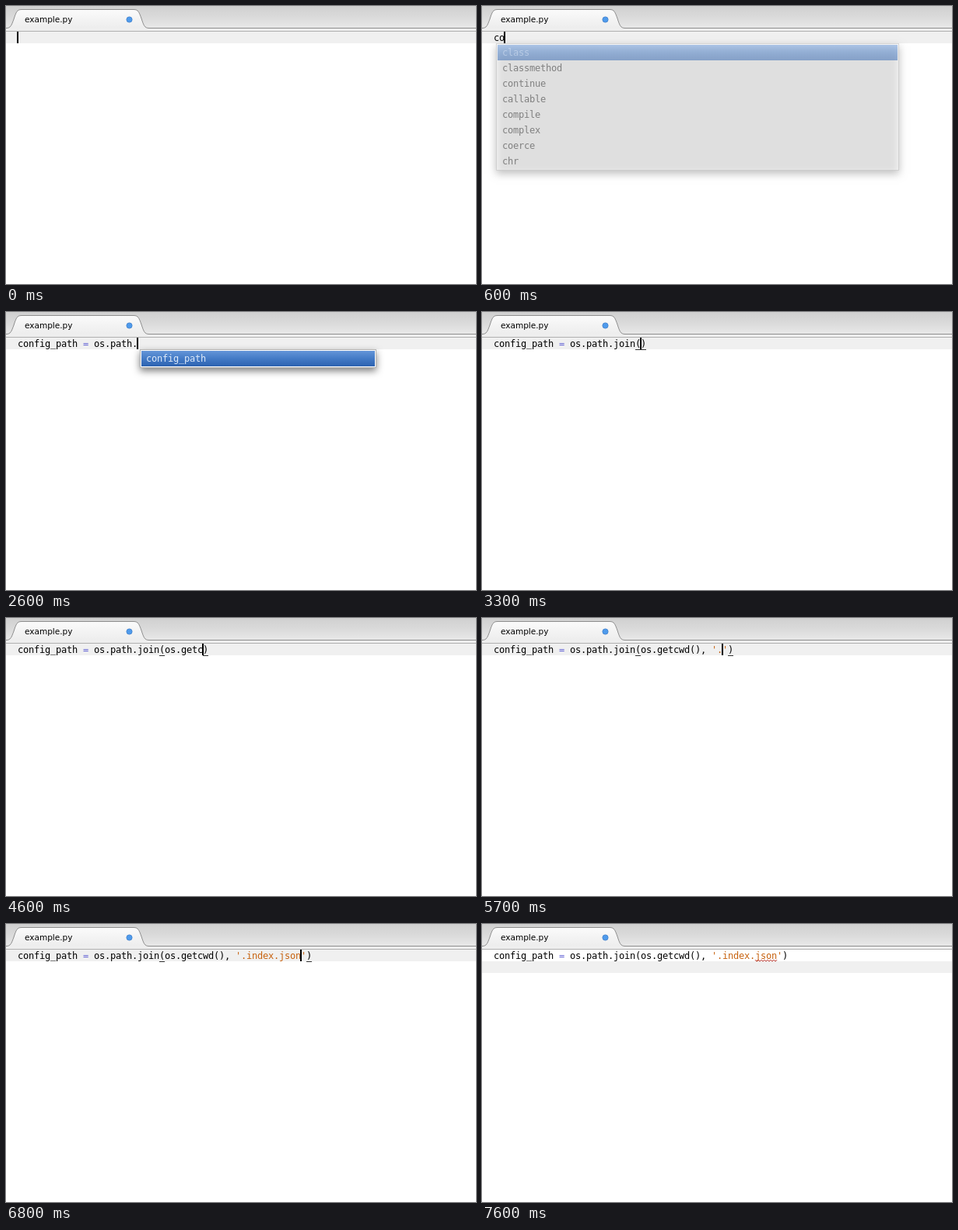
Write an HTML page with a canvas that moves like this. It is 604 px wide and 358 px high and loops after 8000 ms.

```html
<!DOCTYPE html>
<html lang="en">
<head>
<meta charset="utf-8">
<title>Editor autocomplete</title>
<style>
html, body { margin: 0; width: 604px; height: 358px; overflow: hidden; background: #fff; }
canvas { display: block; }
</style>
</head>
<body>
<canvas id="stage" width="604" height="358"></canvas>
<script>
const ctx = document.getElementById('stage').getContext('2d');
const W = 604, H = 358, LOOP = 8000, STEP = 100;
const LEFT = 15, CELL = 7, TOP = 33, ROW = 15;
const MONO = '12px "DejaVu Sans Mono", monospace';
const FULL = "config_path = os.path.join(os.getcwd(), '.index.json')";

// [time, caret column, text after the caret]
const typing = [
  [0, 0, ''], [200, 1, ''], [600, 2, ''], [700, 4, ''], [800, 5, ''],
  [900, 6, ''], [1000, 7, ''], [1100, 8, ''], [1200, 9, ''], [1300, 11, ''],
  [1400, 12, ''], [1500, 13, ''], [1600, 14, ''], [1700, 17, ''],
  [1900, 18, ''], [2000, 19, ''], [2100, 20, ''], [2200, 21, ''],
  [2400, 22, ''], [2700, 23, ''], [3000, 26, ''], [3300, 27, ')'],
  [3400, 28, ')'], [3500, 29, ')'], [3600, 30, ')'], [3800, 31, ')'],
  [4100, 32, ')'], [4300, 33, ')'], [4600, 34, ')'], [4700, 35, ')'],
  [4800, 36, ')'], [5000, 37, '))'], [5300, 38, ')'], [5400, 39, ')'],
  [5500, 40, ')'], [5600, 41, "')"], [5700, 42, "')"], [6000, 45, "')"],
  [6100, 47, "')"], [6300, 48, "')"], [6400, 49, "')"], [6500, 50, "')"],
  [6700, 51, "')"], [6800, 52, "')"]
];
const ENTER = 7000, SPELL = 7300;

const words = ['getcwd', 'join', 'path', 'config_path'];
const starters = ['class', 'classmethod', 'continue', 'callable',
  'compile', 'complex', 'coerce', 'chr'];

// open and close times, column, rows, width
const popups = [
  { open: 300, close: 600, col: 0, rows: starters, width: 518 },
  { open: 1800, close: 1900, col: 17, rows: words.slice(3) },
  { open: 2500, close: 2700, col: 22, rows: words.slice(3) },
  { open: 3700, close: 3800, col: 30, rows: words.slice(1) },
  { open: 5800, close: 6000, col: 42, rows: words },
  { open: 6300, close: 6400, col: 48, rows: words, cut: true },
  { open: 6400, close: 6500, col: 48, rows: ['join'] }
];

const colX = col => LEFT + col * CELL;

function rect(x, y, w, h, fill) {
  ctx.fillStyle = fill;
  ctx.fillRect(x, y, w, h);
}

function gradient(y0, y1, ...colors) {
  const g = ctx.createLinearGradient(0, y0, 0, y1);
  colors.forEach((c, i) => g.addColorStop(i / (colors.length - 1), c));
  return g;
}

// Monospaced text on a whole-pixel grid
function mono(text, x, y, colorAt) {
  ctx.font = MONO;
  [...text].forEach((ch, i) => {
    ctx.fillStyle = colorAt(i, ch);
    ctx.fillText(ch, x + i * CELL, y);
  });
}

function tabPath() {
  ctx.beginPath();
  ctx.moveTo(0, 28.5);
  ctx.bezierCurveTo(6, 28.5, 7, 25, 10, 17);
  ctx.bezierCurveTo(13, 8, 14, 4.5, 20, 4.5);
  ctx.lineTo(164, 4.5);
  ctx.bezierCurveTo(170, 4.5, 171, 8, 174, 16);
  ctx.bezierCurveTo(177, 25, 178, 28.5, 184, 28.5);
}

function drawHeader() {
  rect(0, 0, W, 29, gradient(0, 28, '#d0d0d0', '#dadada', '#e8e8e8'));
  rect(0, 29, W, 3, '#eeeeee');
  rect(0, 28, W, 1, '#8e8e8e');
  tabPath();
  ctx.fillStyle = gradient(4, 30, '#fbfbfb', '#ececec');
  ctx.fill();
  rect(1, 28, 182, 2, '#eeeeee');
  tabPath();
  ctx.strokeStyle = '#8e8e8e';
  ctx.lineWidth = 1;
  ctx.stroke();
  rect(0, 32, W, 1, '#b0b0b0');

  ctx.font = '10.5px "DejaVu Sans", sans-serif';
  ctx.fillStyle = '#000';
  ctx.fillText('example.py', 24, 21);

  ctx.beginPath();
  ctx.arc(158.5, 17.5, 3.6, 0, Math.PI * 2);
  ctx.fillStyle = '#4f9bec';
  ctx.fill();
  ctx.strokeStyle = '#3f7fcb';
  ctx.lineWidth = 0.8;
  ctx.stroke();
}

function drawCode(text) {
  const quote = text.indexOf("'"), end = text.lastIndexOf("'");
  mono(text, LEFT, 45, (i, ch) => {
    if (ch === '=') return '#6a6ad6';
    return quote >= 0 && i >= quote && i <= end ? '#c7620f' : '#000';
  });
}

function drawBrackets(caret, text) {
  if (caret < 27) return;
  const pair = caret === 37 || caret === 38 ? [36, 37] : [26, text.length - 1];
  pair.forEach(col => rect(colX(col), 48, CELL, 1, '#333'));
}

function drawSquiggle() {
  ctx.beginPath();
  for (let x = 0; x <= 28; x += 2) ctx.lineTo(colX(48) + x, x % 4 ? 48.2 : 46.2);
  ctx.strokeStyle = '#b3261c';
  ctx.lineWidth = 1;
  ctx.stroke();
}

function drawPopup({ col, rows, width = 304 }, alpha) {
  const x = colX(col) + 3, y = 48, h = rows.length * 20 + 4;
  ctx.save();
  ctx.globalAlpha = alpha;
  ctx.shadowColor = 'rgba(0,0,0,.5)';
  ctx.shadowBlur = 10;
  ctx.shadowOffsetY = 4;
  rect(x, y, width, h, '#fff');
  ctx.shadowColor = 'transparent';
  ctx.strokeStyle = '#b4b4b4';
  ctx.lineWidth = 1;
  ctx.strokeRect(x + 0.5, y + 0.5, width - 1, h - 1);
  rect(x + 2, y + 2, width - 4, 20, gradient(50, 70, '#6495d8', '#447bc6', '#2c62b0'));
  rows.forEach((row, i) => mono(row, x + 8, 64 + i * 20, () => i ? '#222' : '#dfeaf9'));
  ctx.restore();
}

function popupAlpha(p, t) {
  if (t < p.open) return 0;
  if (t < p.close) return 1;
  return p.cut ? 0 : Math.max(0, 0.5 - (t - p.close) / 240);
}

function draw(t) {
  const done = t >= ENTER;
  const [, caret, tail] = typing.filter(s => s[0] <= t).pop();
  const text = FULL.slice(0, caret) + tail;
  const lineY = TOP + (done ? ROW : 0);

  rect(0, 0, W, H, '#fff');
  drawHeader();
  rect(0, lineY, W, ROW, '#f0f0f0');
  drawCode(text);
  if (!done) drawBrackets(caret, text);
  if (t >= SPELL) drawSquiggle();

  ctx.globalAlpha = Math.min(1, Math.max(0, (7600 - t) / 400));
  rect((done ? LEFT : colX(caret)) - 1, lineY, 2, ROW, '#000');
  ctx.globalAlpha = 1;

  for (const p of popups) {
    const alpha = popupAlpha(p, t);
    if (alpha > 0) drawPopup(p, alpha);
  }
}

const start = performance.now();
function tick() {
  const t = (performance.now() - start) % LOOP;
  draw(Math.floor(t / STEP) * STEP);
  requestAnimationFrame(tick);
}
tick();
</script>
</body>
</html>
```
